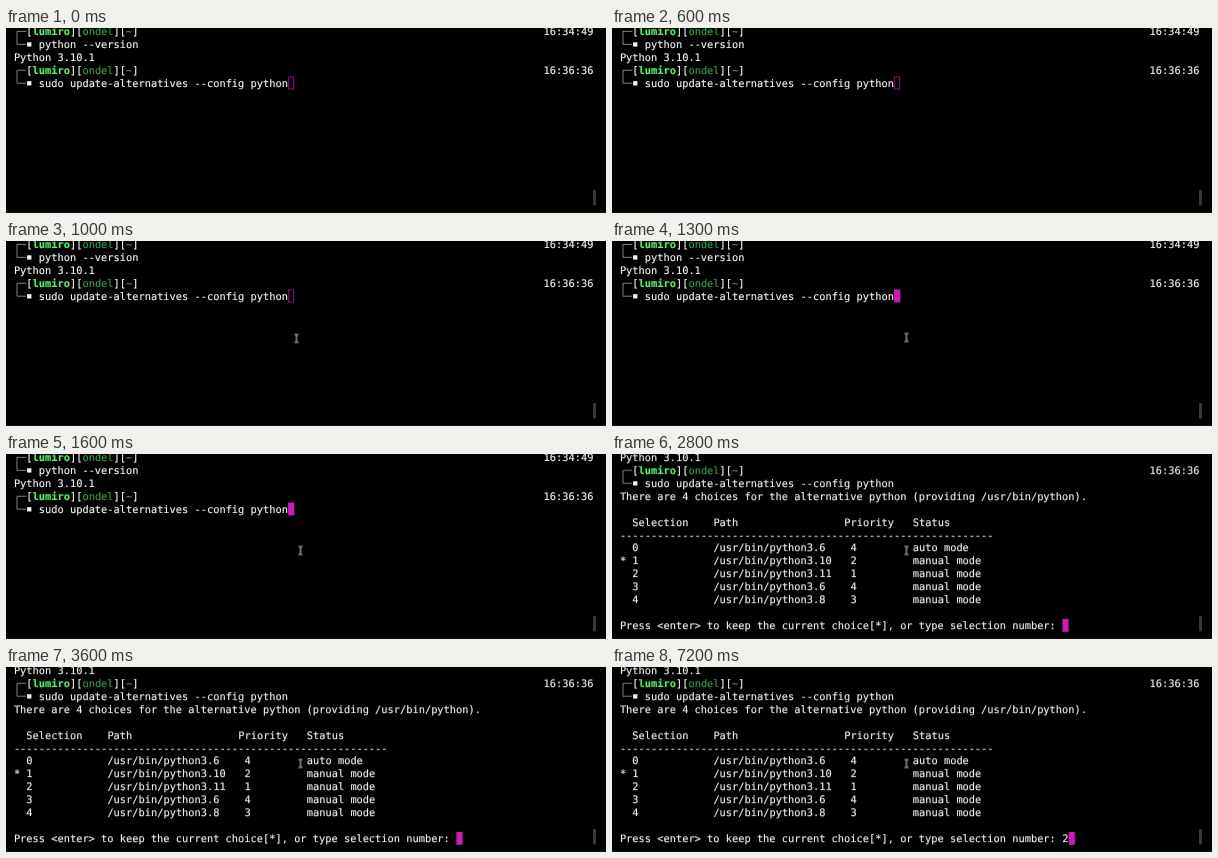
Write an HTML page that moves like this. It is 600 by 185 pixels and loops after 8000 ms.

```html
<!DOCTYPE html>
<html lang="en">
<head>
<meta charset="utf-8">
<title>Terminal</title>
<style>
  html, body { margin: 0; width: 100%; height: 100%; overflow: hidden; background: #000; }
  svg { display: block; width: 600px; height: 185px; }
  text {
    font: 10.352px "DejaVu Sans Mono", monospace;
    text-rendering: geometricPrecision;
    white-space: pre;
    color: #f4f4f4;
    fill: currentColor;
    stroke: currentColor;
    stroke-width: .15;
  }
  .user { font-weight: bold; color: #56f468; }
  .host { color: #36a048; }
  .dir { color: #35a08c; }
  .branch { fill: none; stroke: #a4a4a4; stroke-width: .8; }
  .mark { fill: #f4f4f4; }

  #screen, #menu, #answer, #cursor, #block, #hollow, #pointer {
    animation: 8s step-end infinite;
  }
  #screen { animation-name: scroll; }
  #menu { animation-name: menu; }
  #answer { animation-name: answer; }
  #cursor { animation-name: cursor; }
  #block { animation-name: block; fill: #cc1cb4; }
  #hollow { animation-name: hollow; fill: none; stroke: #9c1689; stroke-width: .9; }
  #pointer { animation-name: pointer; fill: none; stroke: #dcdcdc; stroke-width: 1; }

  @keyframes scroll { 0% { transform: none; } 35%, 100% { transform: translateY(-25.9px); } }
  @keyframes menu { 0% { opacity: 0; } 35%, 100% { opacity: 1; } }
  @keyframes answer { 0% { opacity: 0; } 90%, 100% { opacity: 1; } }
  @keyframes block { 0% { opacity: 0; } 15%, 100% { opacity: 1; } }
  @keyframes hollow { 0% { opacity: 1; } 15%, 100% { opacity: 0; } }
  @keyframes cursor {
    0% { transform: translate(282.1px, 48.5px); }
    35% { transform: translate(450.4px, 190.8px); }
    90%, 100% { transform: translate(456.7px, 190.8px); }
  }
  @keyframes pointer {
    0% { opacity: 0; transform: translate(289px, 109px); }
    10% { opacity: 1; transform: translate(289px, 109px); }
    11.25% { opacity: 1; transform: translate(289px, 102px); }
    12.5% { opacity: 1; transform: translate(290.5px, 97.5px); }
    13.75%, 100% { opacity: 1; transform: translate(294.5px, 96.5px); }
  }
</style>
</head>
<body>
<svg viewBox="0 0 600 185">
  <rect width="600" height="185" fill="#000"/>
  <g id="screen">
    <g id="shell"></g>
    <g id="menu"></g>
    <g id="answer"></g>
    <g id="cursor">
      <rect id="hollow" x=".4" y=".5" width="5.2" height="12"/>
      <rect id="block" width="6.2" height="12.9"/>
    </g>
  </g>
  <path id="pointer" d="M-2-4H-.7L0-3.4L.7-4H2M0-3.4V3.4M-2 4H-.7L0 3.4L.7 4H2"/>
  <rect x="587" y="162" width="3" height="15.5" rx="1" fill="#383838"/>
  <rect y="184" width="600" height="1" fill="#1e0a17"/>
</svg>
<script>
  const LEFT = 7.9, COL = 6.232, ROW = 12.95, BASE = 6.9;
  const [shell, menu, answer] = ['shell', 'menu', 'answer'].map(id => document.getElementById(id));

  function add(parent, tag, attrs, text = '') {
    const el = document.createElementNS('http://www.w3.org/2000/svg', tag);
    for (const key in attrs) el.setAttribute(key, attrs[key]);
    el.textContent = text;
    parent.append(el);
  }

  function put(parent, row, col, text, cls = '') {
    add(parent, 'text', { x: LEFT + col * COL, y: BASE + row * ROW, class: cls }, text);
  }

  function prompt(row, time, command) {
    const y = row * ROW + 3.4;
    add(shell, 'path', { class: 'branch', d: `M20.2 ${y}H11V${y + ROW}H20.2` });
    add(shell, 'rect', { class: 'mark', x: 21.1, y: y + 10.9, width: 4.3, height: 4.3 });
    put(shell, row, 2, '[');
    put(shell, row, 3, 'lumiro', 'user');
    put(shell, row, 9, '][');
    put(shell, row, 11, 'ondel', 'host');
    put(shell, row, 16, '][');
    put(shell, row, 18, '~', 'dir');
    put(shell, row, 19, ']');
    put(shell, row, 85, time);
    put(shell, row + 1, 4, command);
  }

  function tableRow(row, cells, cols) {
    cells.forEach((cell, i) => put(menu, row, cols[i], cell));
  }

  prompt(0, '16:34:49', 'python --version');
  put(shell, 2, 0, 'Python 3.10.1');
  prompt(3, '16:36:36', 'sudo update-alternatives --config python');

  put(menu, 5, 0, 'There are 4 choices for the alternative python (providing /usr/bin/python).');
  tableRow(7, ['Selection', 'Path', 'Priority', 'Status'], [2, 15, 36, 47]);
  put(menu, 8, 0, '-'.repeat(60));
  [['3.6', 4], ['3.10', 2], ['3.11', 1], ['3.6', 4], ['3.8', 3]].forEach(([version, priority], i) => {
    const mode = i ? 'manual mode' : 'auto mode';
    tableRow(9 + i, [i, '/usr/bin/python' + version, priority, mode], [2, 15, 37, 47]);
  });
  put(menu, 10, 0, '*');
  put(menu, 15, 0, 'Press <enter> to keep the current choice[*], or type selection number:');
  put(answer, 15, 71, '2');
</script>
</body>
</html>
```
